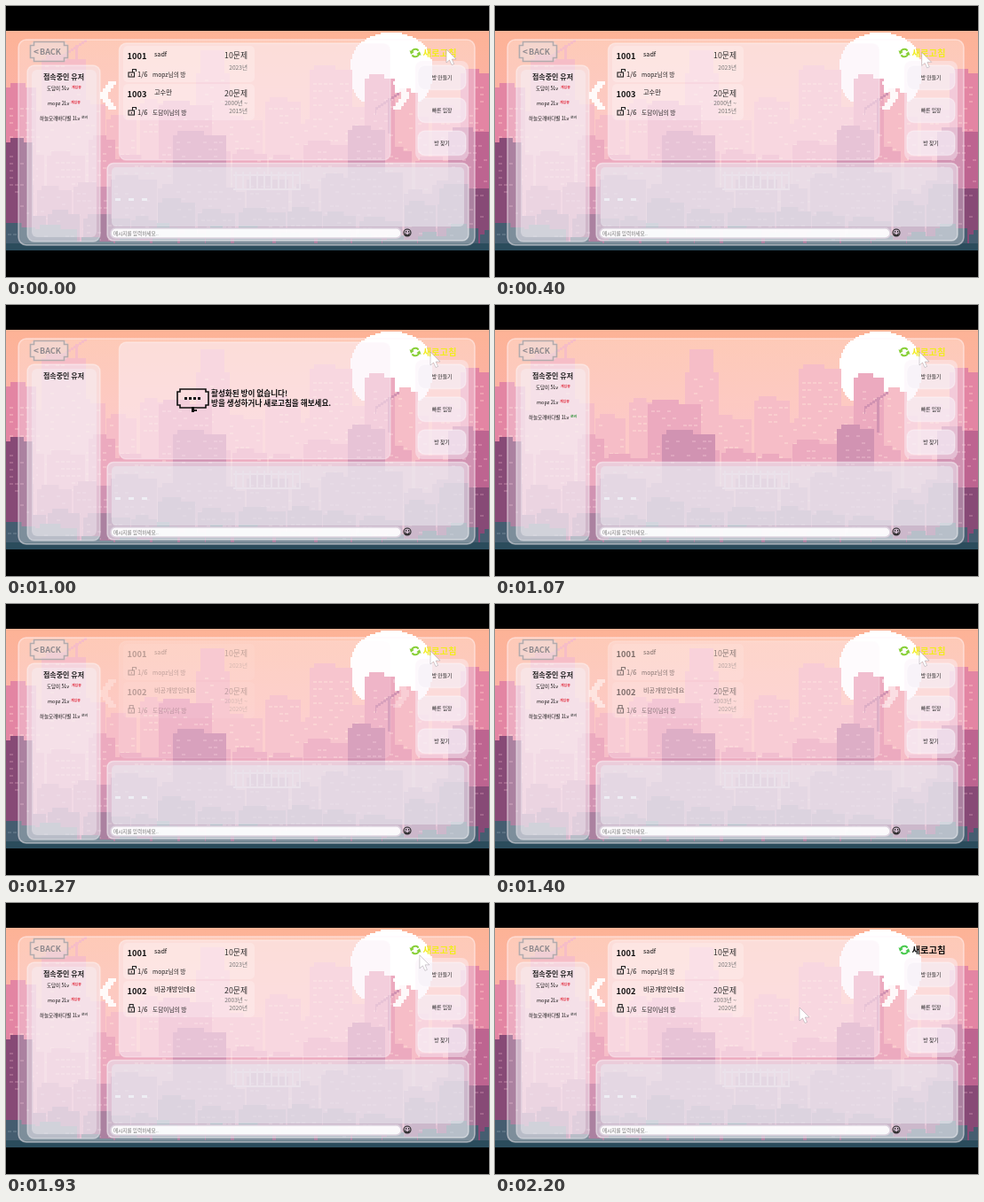
An HTML page with a canvas that plays this animation: 544 by 306 pixels, repeating every 2.27 s.

```html
<!DOCTYPE html>
<html lang="ko">
<head>
<meta charset="utf-8">
<style>
html, body { margin: 0; width: 100%; height: 100%; overflow: hidden; background: #000; }
canvas { display: block; }
</style>
</head>
<body>
<canvas id="stage" width="544" height="306"></canvas>
<script>
const LOOP = 2270;
const CLICK = 925, RELOAD = 1065;
const SANS = '"Noto Sans CJK KR", "Noto Sans CJK", "Noto Sans", sans-serif';
const stage = document.getElementById('stage');
const city = document.createElement('canvas');
city.width = 544;
city.height = 306;
let c = city.getContext('2d');

const clamp = v => Math.max(0, Math.min(1, v));
const ease = v => v * v * (3 - 2 * v);
const white = a => `rgba(255,255,255,${a})`;

let seed = 7;
const random = () => (seed = seed * 16807 % 2147483647) / 2147483647;

function rect(x, y, w, h, color) {
  c.fillStyle = color;
  c.fillRect(x, y, w, h);
}

function panel(x, y, x2, y2, r, fill, line) {
  c.beginPath();
  c.roundRect(x, y, x2 - x, y2 - y, r);
  c.fillStyle = fill;
  c.fill();
  if (line) {
    c.strokeStyle = line;
    c.lineWidth = 1.5;
    c.stroke();
  }
}

function text(s, x, y, size, color = '#222', weight = 500, align = 'left') {
  c.font = `${weight} ${size}px ${SANS}`;
  c.textAlign = align;
  c.textBaseline = 'middle';
  c.fillStyle = color;
  c.fillText(s, x, y);
}

function shape(...points) {
  c.beginPath();
  points.forEach(([x, y]) => c.lineTo(x, y));
  c.closePath();
}

// A box whose corners are cut by one square step.
function steppedBox(x, y, w, h, step, color) {
  const near = [0, step], far = [w, w - step], low = [h, h - step];
  shape(...[[near[1], 0], [far[1], 0], [far[1], step], [w, step], [w, low[1]], [far[1], low[1]],
    [far[1], h], [step, h], [step, low[1]], [0, low[1]], [0, step], [step, step]]
    .map(([px, py]) => [x + px, y + py]));
  c.strokeStyle = color;
  c.lineWidth = 1.6;
  c.stroke();
}

function tower(x, y, w, color, light) {
  rect(x, y, w, 276 - y, color);
  rect(x + 5, y - 5, w * 0.5, 5, color);
  for (let wy = y + 7; wy < 264; wy += 8)
    for (let wx = x + 4; wx < x + w - 5; wx += 6)
      if (random() < 0.35) rect(wx, wy, 4, 2, light);
}

function skyline(top, spread, color, light) {
  for (let x = -8; x < 544;) {
    const w = 28 + Math.floor(random() * 26);
    tower(x, top + Math.floor(random() * spread), w, color, light);
    x += w + Math.floor(random() * 5);
  }
}

function crane(x, y, color) {
  rect(x, y, 3, 40, color);
  for (let i = 0; i < 9; i++) rect(x - 14 + i * 3, y + 10 - i * 2, 3, 3, color);
  rect(x - 14, y + 10, 1, 9, color);
}

function drawCity() {
  const sky = c.createLinearGradient(0, 28, 0, 150);
  sky.addColorStop(0, '#fdb396');
  sky.addColorStop(1, '#fab2b0');
  rect(0, 28, 544, 248, sky);
  for (let y = 30; y < 116; y += 2) {
    const half = 46 * (1 - Math.abs((y - 73) / 44) ** 2.6) ** 0.5;
    rect(434 - Math.round(half / 2) * 2, y, Math.round(half / 2) * 4, 2, '#fff');
  }

  const far = ['#f2a0ae', '#f7b7b9'], mid = ['#e385a3', '#eea0b2'];
  const near = ['#bd6490', '#d07fa3'], dark = ['#874a76', '#a2668c'];
  skyline(108, 26, ...far);
  tower(214, 76, 38, ...far);
  rect(219, 50, 27, 26, far[0]);
  tower(342, 72, 48, ...far);
  tower(40, 60, 50, ...far);
  crane(78, 44, far[0]);
  tower(438, 98, 26, ...far);

  skyline(150, 26, ...mid);
  tower(172, 112, 60, ...mid);
  tower(404, 82, 34, ...mid);
  tower(512, 76, 32, ...mid);
  tower(0, 92, 34, ...mid);
  crane(430, 104, near[0]);

  skyline(186, 28, ...near);
  tower(188, 146, 60, ...near);
  tower(385, 140, 42, ...near);
  tower(498, 142, 46, ...near);
  tower(0, 154, 30, ...dark);

  // Bridge
  rect(256, 190, 76, 2, '#edb3c3');
  rect(256, 206, 76, 2, '#edb3c3');
  for (let x = 258; x < 332; x += 8) rect(x, 187, 2, 20, '#e5a7ba');

  skyline(222, 26, ...dark);
  tower(488, 206, 56, ...dark);
  skyline(250, 20, '#455d70', '#5b7182');
  rect(0, 268, 544, 8, '#2b4c5c');
  for (let x = 123; x < 160; x += 15) rect(x, 217, 6, 3, '#fff');
}

function pixelArrow(x, dir) {
  for (let i = 0; i < 8; i++) rect(x + dir * Math.abs(i - 3.5) * 3 - 4.5, 85 + i * 4, 9, 4, white(0.9));
}

function lock(x, y, open) {
  c.strokeStyle = '#222';
  c.lineWidth = 1.1;
  c.strokeRect(x, y, 6.5, 5);
  const sx = x + (open ? 4.5 : 1.2);
  c.beginPath();
  c.moveTo(sx, y);
  c.lineTo(sx, y - 3.5);
  c.lineTo(sx + 4, y - 3.5);
  c.lineTo(sx + 4, y - (open ? 1 : 0));
  c.stroke();
  rect(x + 2.7, y + 1.8, 1.2, 1.8, '#222');
}

function room(y, r) {
  panel(132, y, 280, y + 41, 5, white(0.22));
  text(r.id, 136.5, y + 11, 9.3, '#111', 900);
  text(r.title, 167, y + 9.5, 7.2, '#111');
  text(r.count, 272, y + 11, 8.8, '#333', 400, 'right');
  r.years.forEach((s, i) => text(s, 272, y + (r.years.length > 1 ? 21 : 24) + i * 9, 6.6, '#777', 400, 'right'));
  lock(138, y + 30, r.open);
  text('1/6', 148, y + 32, 7.6, '#111');
  text(r.owner + '님의 방', 165, y + 32, 6.7);
}

const firstRoom = { id: '1001', title: 'sadf', count: '10문제', years: ['2023년'], owner: 'mopz', open: true };
const oldRoom = { id: '1003', title: '고수만', count: '20문제', years: ['2000년 ~', '2015년'], owner: '도담이', open: true };
const newRoom = { id: '1002', title: '비공개방인데요', count: '20문제', years: ['2003년 ~', '2020년'], owner: '도담이', open: false };

function emptyNotice() {
  steppedBox(193, 95, 35, 21, 3, '#111');
  rect(209, 115, 3, 6, '#111');
  rect(212, 118, 3, 2, '#111');
  for (let i = 0; i < 4; i++) rect(201 + i * 5, 104, 3, 3, '#111');
  text('활성화된 방이 없습니다!', 231, 100, 8.6, '#111', 700);
  text('방을 생성하거나 새로고침을 해보세요.', 231, 111, 8.6, '#111', 700);
}

const reloading = t => t >= CLICK && t < RELOAD;

function rooms(t) {
  if (t >= RELOAD) c.globalAlpha = clamp((t - 1130) / 500);
  panel(127.5, 42, 433, 174, 8, 'rgba(252,240,248,.52)', white(0.3));
  if (reloading(t)) emptyNotice();
  else {
    room(45, firstRoom);
    room(88, t < CLICK ? oldRoom : newRoom);
    pixelArrow(109, 1);
    pixelArrow(451, -1);
  }
  c.globalAlpha = 1;
}

function user(y, name, x, state, stateX, color) {
  text(name, x, y + 0.5, 5.5, '#111');
  text(state, stateX, y, 3.9, color, 700);
}

function users(t) {
  panel(24, 67, 106, 266, 8, 'rgba(246,238,246,.5)', white(0.35));
  panel(29, 72, 102, 261, 6, 'rgba(246,240,246,.4)');
  text('접속중인 유저', 65, 79.5, 8, '#222', 700, 'center');
  if (reloading(t)) return;
  user(92, '도담이 5Lv', 46, '게임중', 74, '#e02a3c');
  user(109, 'mopz 2Lv', 47, '게임중', 73, '#e02a3c');
  user(126, '하늘모래바다별 1Lv', 38, '로비', 85, t >= RELOAD && t < 1200 ? '#2f9138' : '#555');
}

function chat() {
  panel(114, 177.5, 521, 265, 7, 'rgba(236,236,243,.52)', white(0.45));
  panel(119, 182, 516, 249, 5, 'rgba(234,234,240,.55)');
  panel(118, 251, 445, 262, 5.5, white(0.92), '#ddd3df');
  text('메시지를 입력하세요..', 121, 256.5, 5.6, '#777');
  c.strokeStyle = '#222';
  c.lineWidth = 1.1;
  c.beginPath();
  c.arc(452, 256, 4, 0, 7);
  c.moveTo(454.3, 256.5);
  c.arc(452, 256.5, 2.3, 0, Math.PI);
  c.stroke();
  rect(450, 254, 1.2, 1.5, '#222');
  rect(453, 254, 1.2, 1.5, '#222');
}

function backButton() {
  panel(28, 41, 69, 62, 4, 'rgba(235,226,228,.5)');
  steppedBox(27.5, 40.5, 42, 22, 4, '#b3abad');
  text('<', 31, 51, 10, '#8f898e', 700);
  text('BACK', 38, 51.5, 9, '#8f898e', 700);
}

function sideButtons() {
  panel(461, 62, 521, 174, 8, 'rgba(250,240,248,.45)');
  ['방 만들기', '빠른 입장', '방 찾기'].forEach((s, i) => {
    const y = 67 + i * 37;
    panel(464, y, 518, y + 27.5, 8, 'rgba(246,240,248,.6)', white(0.3));
    text(s, 491, y + 13.5, 5.8, '#222', 500, 'center');
  });
}

function refreshButton(hover) {
  const green = hover ? '#86cf35' : '#46c94b';
  c.strokeStyle = green;
  c.lineWidth = 2;
  for (const turn of [0.25, Math.PI + 0.25]) {
    c.save();
    c.translate(461, 53);
    c.rotate(turn);
    c.beginPath();
    c.arc(0, 0, 4.3, 0, 2.3);
    c.stroke();
    shape([1.5, 1], [7, 1], [4.3, -3]);
    c.fillStyle = green;
    c.fill();
    c.restore();
  }
  text('새로고침', 469.5, 53, 10.3, hover ? '#f1ec20' : '#111', 700);
}

function cursor(x, y) {
  c.save();
  c.translate(x, y);
  shape([0, 0], [0, 15], [3.5, 12], [6, 17.5], [8.5, 16.5], [6.2, 11], [11, 11]);
  c.restore();
  c.fillStyle = '#fff';
  c.fill();
  c.strokeStyle = 'rgba(150,140,150,.6)';
  c.lineWidth = 0.7;
  c.stroke();
}

function draw(t) {
  c.drawImage(city, 0, 0);
  panel(14, 38, 528, 270, 9, white(0.3), 'rgba(255,245,250,.5)');
  users(t);
  rooms(t);
  chat();
  sideButtons();
  backButton();
  const settle = ease(clamp(t / 530));
  const leave = ease(clamp((t - 1870) / 330));
  const x = 496 - 18 * settle - 135 * leave;
  const y = 49 + 4 * settle + 65 * leave;
  refreshButton(x > 453);
  cursor(x, y);
}

drawCity();
c = stage.getContext('2d');
const start = performance.now();
function frame() {
  draw((performance.now() - start) % LOOP);
  requestAnimationFrame(frame);
}
frame();
</script>
</body>
</html>
```
